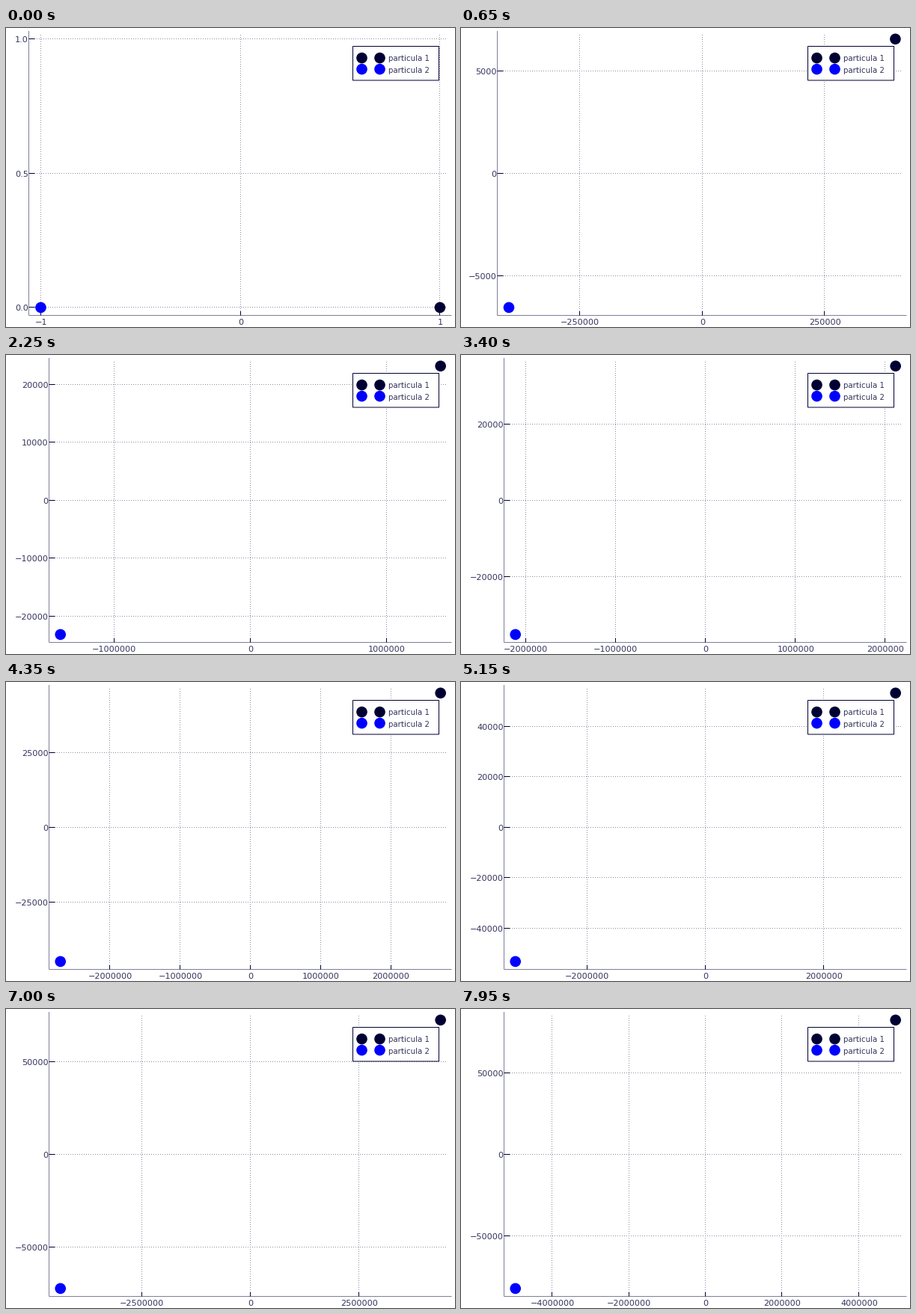
Recreate the animation shown at these times as a matplotlib script. Size 600 by 400 pixels, loop 8000 ms.

```python
import math
import matplotlib.pyplot as plt
from matplotlib.animation import FuncAnimation
from matplotlib.collections import LineCollection
from matplotlib.patches import Circle, Rectangle

W, H, DPI = 600, 400, 100
FRAMES, STEP_MS = 160, 50
PX = 72 / DPI
NAVY, BLUE, AXIS, GRID = "#000033", "#0000ff", "#7f7f99", "#8c8ca4"
RIGHT, TOP, BOTTOM = 595.5, 4, 384.7
PAD = 0.03
SPEED, LAG, SLOPE = 31240, 0.4, 0.01663
NICENESS = {1: 1, 5: 0.9, 2: 0.7, 2.5: 0.5, 3: 0.2}
MAX_TICKS = 10

fig = plt.figure(figsize=(W / DPI, H / DPI), dpi=DPI, facecolor="white")
ax = fig.add_axes([0, 0, 1, 1])
ax.set_xlim(0, W)
ax.set_ylim(H, 0)
ax.axis("off")


def lines(color, z, **kw):
    art = LineCollection([], colors=color, linewidths=PX, zorder=z, **kw)
    art.set_snap(False)
    return ax.add_collection(art, autolim=False)


def dot(x, y, color, z):
    return ax.add_patch(Circle((x, y), 7.3, fc=color, ec="none", zorder=z))


def label(x, y, text, size, align):
    return ax.text(x, y, text, family="DejaVu Sans", fontsize=size * PX,
                   color=NAVY, alpha=0.8, ha=align, va="baseline", zorder=6)


def crisp(v):
    """Centre of the pixel that holds v."""
    return math.floor(v) + 0.5


def widen(lo, hi):
    d = PAD * (hi - lo)
    return lo - d, hi + d


def find_ticks(lo, hi):
    """Best-scoring round ticks: granularity, coverage and niceness."""
    span = hi - lo
    order = math.floor(math.log10(span))
    best, chosen = -1, None
    for z in range(order, order - 3, -1):
        for q, nice in NICENESS.items():
            step = q * 10.0 ** z
            a, b = math.floor(lo / step), math.ceil(hi / step)
            k = b - a + 1
            vals = [i * step for i in range(a, b + 1) if lo <= i * step <= hi]
            if len(vals) < 2 or k > MAX_TICKS:
                continue
            score = (0.25 * max(0, 1 - abs(k - 5) / 5)
                     + 0.5 * span / ((k - 1) * step) + 0.25 * nice)
            if score > best:
                best, chosen = score, (vals, step)
    vals, step = chosen
    form = "%.1f" if step < 1 else "%.0f"
    return vals, [(form % v).replace("-", "\u2212") for v in vals]


def place(pool, spots):
    """Show one label per (x, y, text) and blank the spare ones."""
    for i, art in enumerate(pool):
        x, y, text = spots[i] if i < len(spots) else (0, 0, "")
        art.set_position((x, y))
        art.set_text(text)


grid = lines(GRID, 1, linestyles=[(0, (1, 2))])
frame = lines(AXIS, 2)
marks = lines(NAVY, 3)
first = dot(0, 0, NAVY, 4)
second = dot(0, 0, BLUE, 4)
x_labels = [label(0, 0, "", 11.3, "center") for _ in range(MAX_TICKS)]
y_labels = [label(0, 0, "", 11.3, "right") for _ in range(MAX_TICKS)]

ax.add_patch(Rectangle((463.5, 24.5), 115, 45.5, fc="white", ec=NAVY,
                       lw=PX, snap=False, zorder=5))
for row, color in enumerate((NAVY, BLUE)):
    for x in (475.5, 499.5):
        dot(x, 40.1 + 15 * row, color, 6)
    label(510.8, 44 + 16 * row, "particula %d" % (row + 1), 10.2, "left")


def update(n):
    if n == 0:
        px, py = 1, 0
        ylim = widen(0, 1)
    else:
        px = SPEED * (n - LAG)
        py = SLOPE * px
        ylim = widen(-py, py)
    xlim = widen(-px, px)
    xt, xtext = find_ticks(*xlim)
    yt, ytext = find_ticks(*ylim)
    left = 3.5 + 9 * max(map(len, ytext))

    def sx(v):
        return left + (v - xlim[0]) / (xlim[1] - xlim[0]) * (RIGHT - left)

    def sy(v):
        return BOTTOM - (v - ylim[0]) / (ylim[1] - ylim[0]) * (BOTTOM - TOP)

    cols = [crisp(sx(v)) for v in xt]
    rows = [crisp(sy(v)) for v in yt]
    base = crisp(BOTTOM)
    grid.set_segments([[(x, 9), (x, 379)] for x in cols]
                      + [[(left + 7.5, y), (588, y)] for y in rows])
    marks.set_segments([[(x, base), (x, base - 5.5)] for x in cols]
                       + [[(left, y), (left + 8, y)] for y in rows])
    frame.set_segments([[(left, TOP), (left, base)],
                        [(left, base), (RIGHT, base)]])
    place(x_labels, [(sx(v) + 0.5, 397, s) for v, s in zip(xt, xtext)])
    place(y_labels, [(left - 0.8, sy(v) + 4.5, s) for v, s in zip(yt, ytext)])
    first.center = sx(px) + 0.4, sy(py)
    second.center = sx(-px), sy(-py)
    return [grid, frame, marks, first, second, *x_labels, *y_labels]


anim = FuncAnimation(fig, update, frames=FRAMES, interval=STEP_MS,
                     init_func=lambda: update(0), repeat=True, repeat_delay=0)
plt.show()
```
